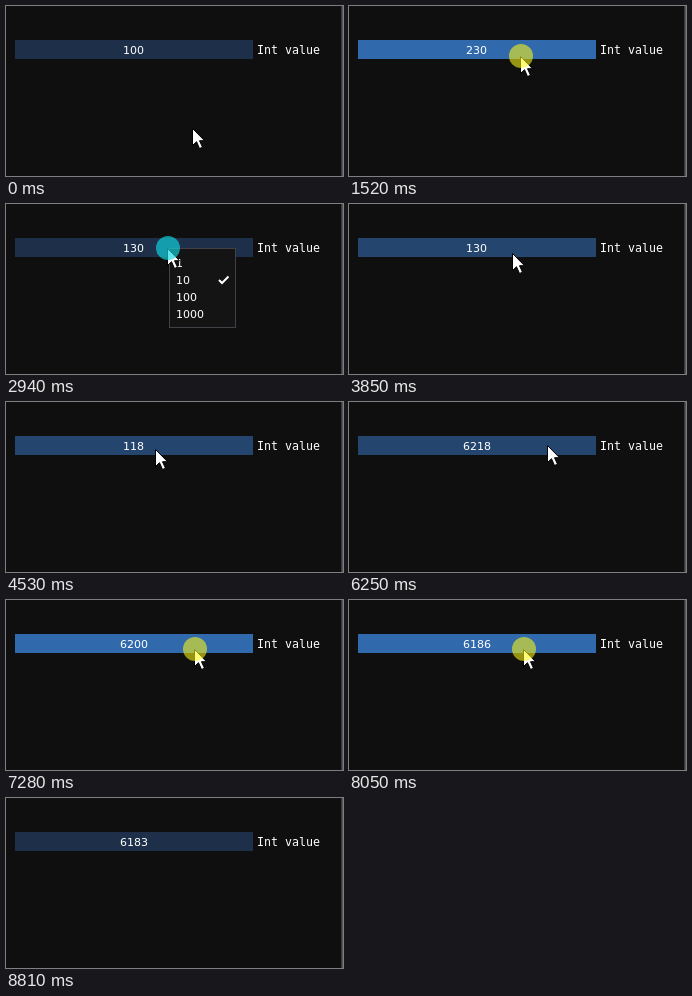
An HTML page with a canvas for the animation above (8940 ms loop, 337 by 170 pixels).

```html
<!DOCTYPE html>
<html lang="en">
<head>
<meta charset="utf-8">
<title>Drag value</title>
<style>
html, body { margin: 0; width: 100%; height: 100%; overflow: hidden; background: #0f0f0f; }
canvas { display: block; }
</style>
</head>
<body>
<canvas id="stage" width="337" height="170"></canvas>
<script>
const ctx = document.getElementById('stage').getContext('2d');
const LOOP = 8940, TICK = 69;
const STEPS = [1, 10, 100, 1000];
const FREE = 0, DRAG = 1, RIGHT = 2, MENU = 3, PICK = 4;

// time, pointer x, pointer y, mode until the next key, value change per pixel
const KEYS = [
  [0, 187, 122, FREE],
  [480, 161, 50, FREE],
  [550, 159, 45, DRAG, 10],
  [900, 174, 46, DRAG, 10],
  [1040, 177, 46, DRAG, 10],
  [1240, 177, 46, DRAG, 10],
  [1520, 172, 50, DRAG, 10],
  [1730, 162, 51, DRAG, 10],
  [1800, 162, 51, FREE],
  [1870, 161, 50, FREE],
  [2400, 161, 50, FREE],
  [2670, 162, 44, FREE],
  [2940, 162, 44, RIGHT],
  [3090, 162, 44, RIGHT],
  [3160, 164, 47, MENU],
  [3300, 169, 52, MENU],
  [3570, 169, 52, PICK],
  [3710, 169, 52, FREE],
  [3910, 162, 48, DRAG, 1],
  [4400, 150, 47, DRAG, 1],
  [4530, 150, 47, FREE],
  [4800, 150, 47, RIGHT],
  [4870, 150, 47, MENU],
  [5010, 160, 95, PICK],
  [5150, 160, 95, FREE],
  [5410, 138, 46, FREE],
  [5490, 138, 46, FREE],
  [5560, 138, 46, DRAG, 100],
  [5910, 195, 43, DRAG, 100],
  [6040, 195, 43, DRAG, 100],
  [6180, 199, 43, DRAG, 100],
  [6250, 199, 43, FREE],
  [6450, 199, 43, RIGHT],
  [6520, 199, 43, MENU],
  [6660, 207, 55, PICK],
  [6800, 207, 55, FREE],
  [6940, 207, 50, FREE],
  [7000, 207, 50, DRAG, 1],
  [7280, 189, 49, DRAG, 1],
  [8190, 172, 49, DRAG, 1],
  [8260, 172, 48, FREE],
  [8460, 172, 48, FREE],
  [8810, 215, 175, FREE],
  [LOOP, 215, 175, FREE]
];

function stateAt(t) {
  let value = 100, step = 10, menu = null;
  for (let i = 0; ; i++) {
    const [t0, x0, y0, mode, rate = 0] = KEYS[i];
    const [t1, x1, y1] = KEYS[i + 1];
    if (rate) step = rate;
    if (mode === RIGHT) menu = { x: x0 + 1, y: y0 };
    else if (mode < RIGHT) menu = null;
    if (t >= t1) {
      value += rate * (x1 - x0);
      continue;
    }
    // the pointer is sampled at a steady tick
    const n = Math.max(1, Math.round((t1 - t0) / TICK));
    const k = Math.floor((t - t0) / (t1 - t0) * n) / n;
    const x = Math.round(x0 + (x1 - x0) * k);
    const y = Math.round(y0 + (y1 - y0) * k);
    return { x, y, mode, menu, step, value: value + rate * (x - x0) };
  }
}

function rect(color, x, y, w, h) {
  ctx.fillStyle = color;
  ctx.fillRect(x, y, w, h);
}

function text(str, x, y, font = '11px "DejaVu Sans", sans-serif') {
  ctx.font = font;
  ctx.fillStyle = '#fff';
  ctx.fillText(str, x, y);
}

function drawMenu({ menu, step, mode, x: px, y: py }) {
  const { x, y } = menu;
  rect('#414148', x, y, 67, 80);
  rect('#141414', x + 1, y + 1, 65, 78);
  STEPS.forEach((s, i) => {
    const top = y + 6 + 17 * i;
    if (px >= x + 4 && px < x + 63 && py >= top && py < top + 17) {
      rect(mode === PICK ? '#4296fa' : '#397ccc', x + 4, top, 59, 17);
    }
    text(s, x + 7, top + 13);
    if (s === step) {
      ctx.strokeStyle = '#fff';
      ctx.lineWidth = 2;
      ctx.beginPath();
      ctx.moveTo(x + 50, top + 9);
      ctx.lineTo(x + 53, top + 12);
      ctx.lineTo(x + 59.5, top + 5.5);
      ctx.stroke();
    }
  });
}

const arrow = new Path2D('M0 0V17L4 13.2L7 20L10 18.7L7 12.2H12Z');

function drawPointer({ x, y, mode }) {
  ctx.save();
  ctx.translate(x - 0.5, y + 0.5);
  ctx.fillStyle = '#fff';
  ctx.strokeStyle = '#000';
  ctx.lineWidth = 1;
  ctx.fill(arrow);
  ctx.stroke(arrow);
  ctx.restore();
  if (mode === FREE || mode === MENU) return;
  ctx.fillStyle = mode === RIGHT ? 'rgba(16,215,225,.66)' : 'rgba(255,250,20,.57)';
  ctx.beginPath();
  ctx.arc(x, y, 12, 0, Math.PI * 2);
  ctx.fill();
}

function draw(t) {
  const s = stateAt(t);
  const over = !s.menu && s.x >= 9 && s.x < 247 && s.y >= 34 && s.y < 53;
  rect('#0f0f0f', 0, 0, 337, 170);
  rect('#3a3a3f', 335, 0, 1, 170);
  rect('#555558', 336, 0, 1, 170);
  rect(s.mode === DRAG ? '#316aac' : over ? '#24456d' : '#1d2f49', 9, 34, 238, 19);
  const label = String(s.value);
  text(label, Math.floor(128 - label.length * 3.5), 48);
  text('Int value', 251, 48, '11.63px "DejaVu Sans Mono", monospace');
  if (s.menu) drawMenu(s);
  drawPointer(s);
}

const start = performance.now();
function frame() {
  draw((performance.now() - start) % LOOP);
  requestAnimationFrame(frame);
}
frame();
</script>
</body>
</html>
```
